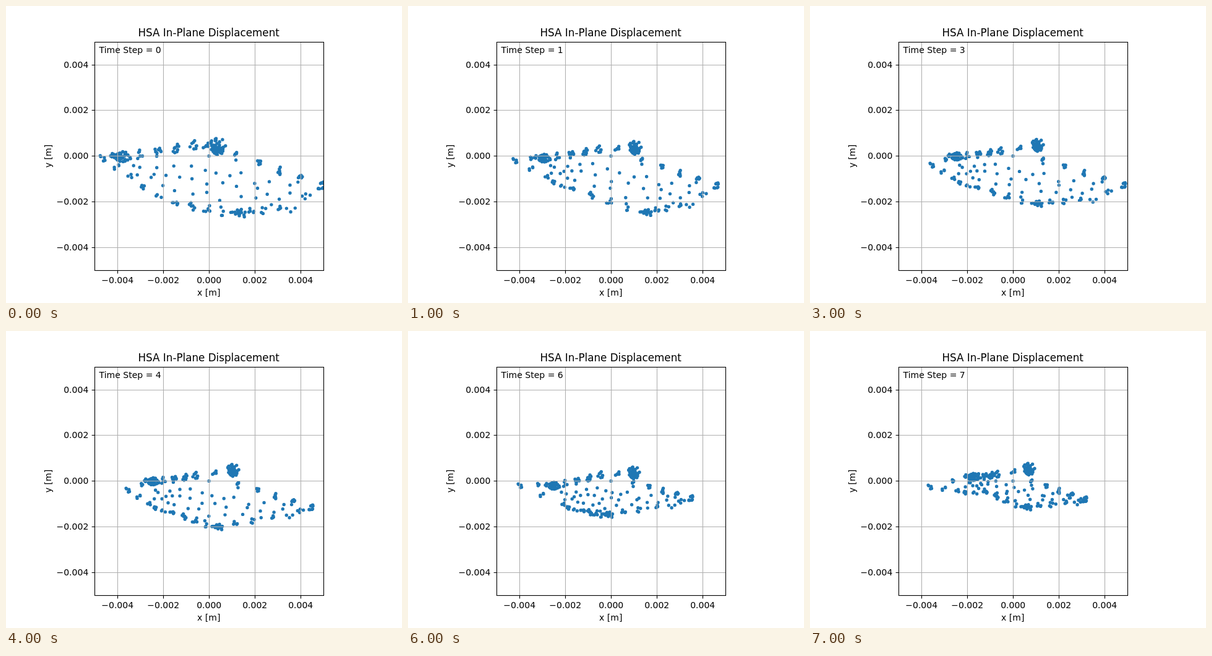
An HTML page that plays this animation: 640 px wide and 480 px high, repeating every 8000 ms.

```html
<!DOCTYPE html>
<html>
<head>
<meta charset="utf-8">
<style>
html, body { margin: 0; width: 100%; height: 100%; overflow: hidden; background: #fff; }
svg { display: block; width: 640px; height: 480px; }
text { font-family: "DejaVu Sans", sans-serif; font-size: 14px; fill: #000; }
.mid { text-anchor: middle; }
.end { text-anchor: end; }
</style>
</head>
<body>
<svg viewBox="0 0 640 480">
  <clipPath id="box"><rect x="143" y="58" width="370" height="369.5"/></clipPath>
  <path id="dots" clip-path="url(#box)" fill="none" stroke="#1f77b4" stroke-width="5.4" stroke-linecap="round"/>
  <g id="axes"></g>
  <rect x="143.5" y="58.5" width="370" height="369" fill="none" stroke="#000" stroke-width="1.11"/>
  <text class="mid" x="327.7" y="49" style="font-size:16.75px">HSA In-Plane Displacement</text>
  <text class="mid" x="327.7" y="468">x [m]</text>
  <text class="mid" transform="translate(73 242.5) rotate(-90)">y [m]</text>
  <text id="label" x="150.6" y="76"></text>
</svg>
<script>
const $ = id => document.getElementById(id);

// Grid, ticks and tick labels
const ticks = ['−0.004', '−0.002', '0.000', '0.002', '0.004'];
$('axes').innerHTML = ticks.map((name, i) => {
  const x = Math.round(180.16 + 73.92 * i) + 0.5;
  const y = Math.round(390.24 - 73.92 * i) + 0.5;
  return `<path d="M${x} 58V427M144 ${y}H513" stroke="#b0b0b0" stroke-width="1.11"/>
    <path d="M${x} 427.5v4.9M143.5 ${y}h-4.9" stroke="#000" stroke-width="1.11"/>
    <text class="mid" x="${x - 0.3}" y="448">${name}</text>
    <text class="end" x="133.3" y="${y + 4.5}">${name}</text>`;
}).join('');

// Corners of the ring, clockwise from its left tip
const TIP = 0, LEFT = 1, TOP = 2, HUB = 3, KINK = 4, RIGHT = 5, HEEL = 6, BASE = 7, DIP = 8, TAIL = 9;
const rings = {
  0: [155,246, 186,245, 303,224, 342,227, 373,243, 509,290, 460,326, 376,335, 273,321, 200,276],
  1: [172,250, 218,247, 308,231, 367,229, 379,251, 498,290, 455,320, 385,334, 265,297, 224,277],
  2: [181,250, 229,245, 311,235, 369,225, 379,252, 509,290, 457,318, 390,322, 276,295, 235,273],
  4: [196,257, 236,244, 306,233, 367,225, 376,249, 493,285, 458,297, 342,317, 268,295, 231,280],
  6: [180,250, 234,251, 311,232, 365,229, 365,247, 457,270, 426,281, 323,297, 282,292, 251,281],
  7: [193,252, 262,237, 302,231, 354,223, 359,245, 444,272, 432,276, 350,285, 283,262, 238,259]
};

const mix = (a, b, k) => a + (b - a) * k;
const clamp = v => Math.max(0, Math.min(1, v));

// The left side moves on before the right side does
const between = (a, b) => a.map((v, i) => mix(v, b[i], clamp((560 - a[i & ~1]) / 360)));
rings[3] = between(rings[2], rings[4]);
rings[5] = between(rings[4], rings[6]);

let seed = 41;
const rnd = () => (seed = (seed * 16807) % 2147483647) / 2147483647;

// A dot sits at a place on the ring plus a fixed random offset
const dots = [];
function scatter(n, rx, ry, place) {
  for (let i = 0; i < n; i++) {
    const r = Math.sqrt(rnd()), a = rnd() * 2 * Math.PI;
    dots.push({ place, dx: rx * r * Math.cos(a), dy: ry * r * Math.sin(a) });
  }
}

const corner = (ring, i) => ring.slice(2 * i, 2 * i + 2);
const lerp = (p, q, k) => p.map((v, j) => mix(v, q[j], k));
const onLeg = (a, b, k) => ring => lerp(corner(ring, a), corner(ring, b), k);

// Evenly spaced clumps along one leg of the ring
function leg(a, b, clumps, n, rx, ry) {
  for (let i = 1; i <= clumps; i++)
    scatter(Math.round(n * mix(0.75, 1.25, rnd())), rx, ry, onLeg(a, b, i / clumps));
}
leg(TIP, LEFT, 2, 5, 6, 6);
leg(LEFT, TOP, 4, 8, 5, 7);
leg(TOP, HUB, 2, 5, 5, 6);
leg(HUB, KINK, 1, 6, 4, 6);
leg(KINK, RIGHT, 4, 8, 5, 6);
leg(RIGHT, HEEL, 2, 4, 6, 6);
leg(HEEL, BASE, 4, 5, 5, 5);
leg(BASE, DIP, 4, 5, 5, 6);
leg(DIP, TAIL, 3, 3, 5, 4);
leg(TAIL, TIP, 2, 4, 6, 5);

// Crowded spots
scatter(30, 15, 8, onLeg(LEFT, TOP, 0));
scatter(48, 11, 11, onLeg(HUB, KINK, 0));
scatter(12, 12, 6, onLeg(BASE, DIP, 0));

// Loose dots in columns between the upper and the lower side
const upper = [LEFT, TOP, KINK, RIGHT], lower = [TAIL, DIP, BASE, HEEL];
for (let col = 1; col < 12; col++) {
  const s = Math.floor(col / 4), k = col / 4 - s;
  const up = onLeg(upper[s], upper[s + 1], k);
  const low = onLeg(lower[s], lower[s + 1], k);
  for (const v of [0.35, 0.55, 0.75])
    scatter(1, 9, 6, ring => lerp(up(ring), low(ring), v));
}

function plot(step) {
  const spread = 0.88 + 0.37 / (1 + step) ** 2;
  return 'M328 242.4h0' + dots.map(({ place, dx, dy }) => {
    const [x, y] = place(rings[step]);
    return `M${(x + dx * spread).toFixed(1)} ${(y + dy * spread).toFixed(1)}h0`;
  }).join('');
}

let shown = -1;
function draw(ms) {
  const step = Math.floor(ms / 1000) % 8;
  if (step === shown) return;
  shown = step;
  $('dots').setAttribute('d', plot(step));
  $('label').textContent = 'Time Step = ' + step;
}

const start = performance.now();
function tick() {
  draw(performance.now() - start);
  requestAnimationFrame(tick);
}
tick();
</script>
</body>
</html>
```
